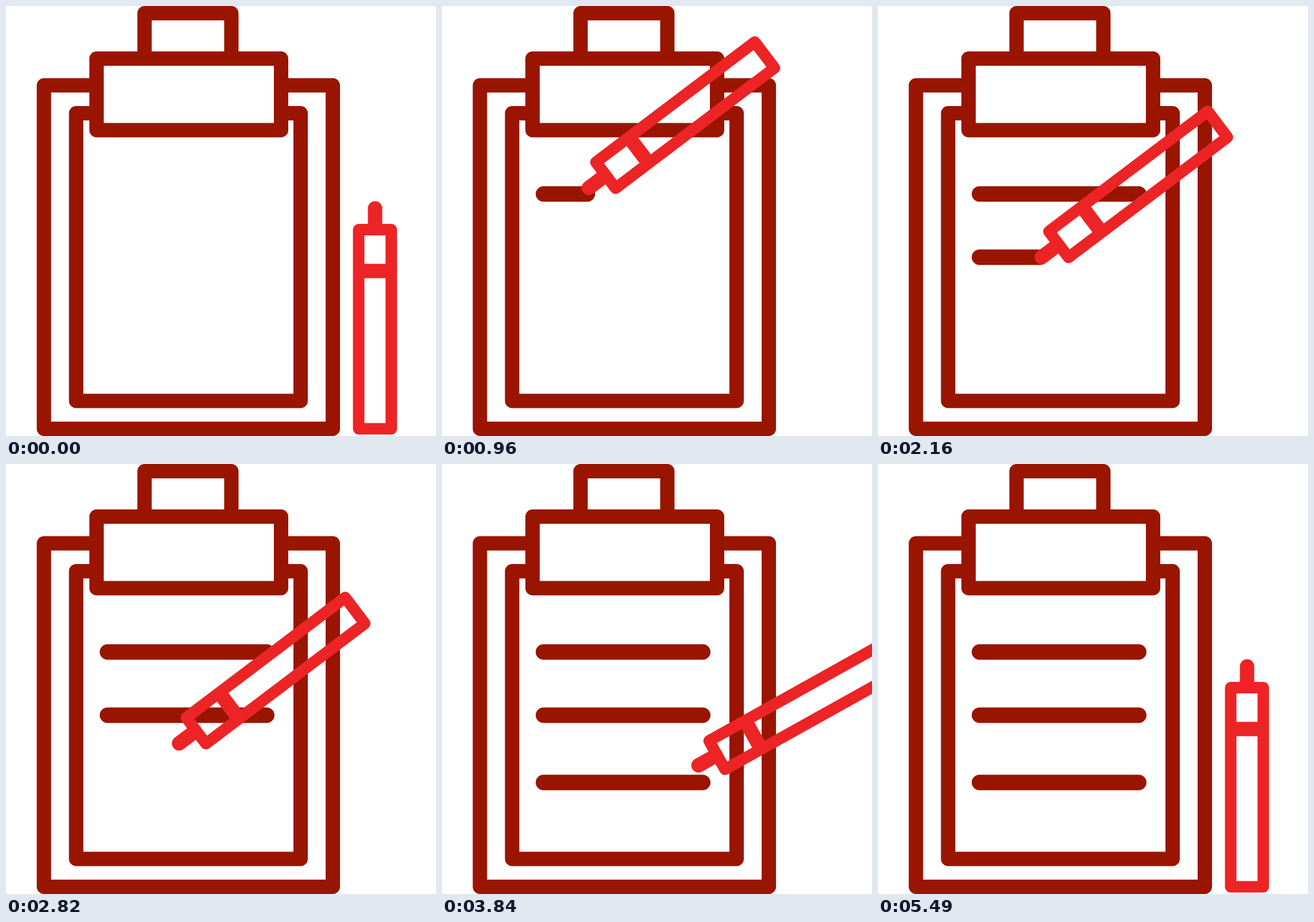
An HTML page for the animation above (5610 ms loop, 748 px wide and 748 px high).

```html
<!DOCTYPE html>
<html lang="en">
<head>
<meta charset="utf-8">
<title>Clipboard and pen</title>
<style>
  html, body { margin: 0; width: 100%; height: 100%; overflow: hidden; background: #fff; }
  svg { display: block; width: 100vw; height: 100vh; }
  g { fill: none; stroke-linecap: round; stroke-linejoin: round; }
  .board { stroke: #991500; stroke-width: 25; }
  .lines { stroke: #991500; stroke-width: 27; }
  .pen { stroke: #ec2426; stroke-width: 20; }
  .pen .thick { stroke-width: 25; }
  .pen .bar { stroke-linecap: butt; }
</style>
</head>
<body>
<svg viewBox="0 0 748 748">
  <g class="board">
    <path d="M157.5 138H66V735.5H568.5V138H478.5"/>
    <path d="M157.5 186.5H122V687H512.5V186.5H478.5"/>
    <path d="M157.5 91.5H478.5V216H157.5Z"/>
    <path d="M241 91.5V12.5H392V91.5"/>
  </g>
  <g class="lines"></g>
  <!-- The pen is drawn around its own centre, tip up. -->
  <g class="pen">
    <path d="M-28.5 -153.5H28.2V193H-28.5Z"/>
    <path class="thick bar" d="M-28.5 -81.5H28.2"/>
    <path class="thick" d="M0 -190.5V-156"/>
  </g>
</svg>
<script>
const LOOP = 5610, STEP = 30;
const LEFT = 176.5, RIGHT = 453.5;
const TILT = -127.1;

// time, centre x, centre y, rotation
const penKeys = [
  [240, 642, 542.5, 0],
  [690, 323, 201, TILT],
  [1620, 613, 203, TILT],
  [1740, 613, 203, TILT],
  [1920, 332.7, 327, TILT],
  [2550, 605.7, 314, TILT],
  [2700, 605.7, 314, TILT],
  [2910, 338.5, 414, TILT],
  [3540, 610.5, 424, TILT],
  [3810, 610.5, 424, TILT],
  [4290, 642, 542.5, 0]
];

// y, start time, end time
const strokes = [
  [327, 709, 1620],
  [437, 1920, 2550],
  [554, 2927, 3570]
];

const pen = document.querySelector('.pen');
const group = document.querySelector('.lines');
const clamp = v => Math.min(1, Math.max(0, v));
const mix = (a, b, k) => a + (b - a) * k;

const lines = strokes.map(([y]) => {
  const line = document.createElementNS('http://www.w3.org/2000/svg', 'line');
  const attrs = { x1: LEFT, x2: LEFT, y1: y, y2: y };
  for (const name in attrs) line.setAttribute(name, attrs[name]);
  return group.appendChild(line);
});

function penAt(t) {
  const next = penKeys.findIndex(key => key[0] > t);
  if (next <= 0) return penKeys[0].slice(1);
  const a = penKeys[next - 1], b = penKeys[next];
  const k = (t - a[0]) / (b[0] - a[0]);
  return [1, 2, 3].map(i => mix(a[i], b[i], k));
}

function draw(now) {
  const t = Math.floor((now % LOOP) / STEP) * STEP;
  const [x, y, angle] = penAt(t);
  pen.setAttribute('transform', `translate(${x} ${y}) rotate(${angle})`);
  strokes.forEach(([, start, end], i) => {
    const k = clamp((t - start) / (end - start));
    lines[i].setAttribute('x2', mix(LEFT, RIGHT, k));
    lines[i].setAttribute('visibility', k > 0 ? 'visible' : 'hidden');
  });
}

const begin = performance.now();
function tick() {
  draw(performance.now() - begin);
  requestAnimationFrame(tick);
}
tick();
</script>
</body>
</html>
```
